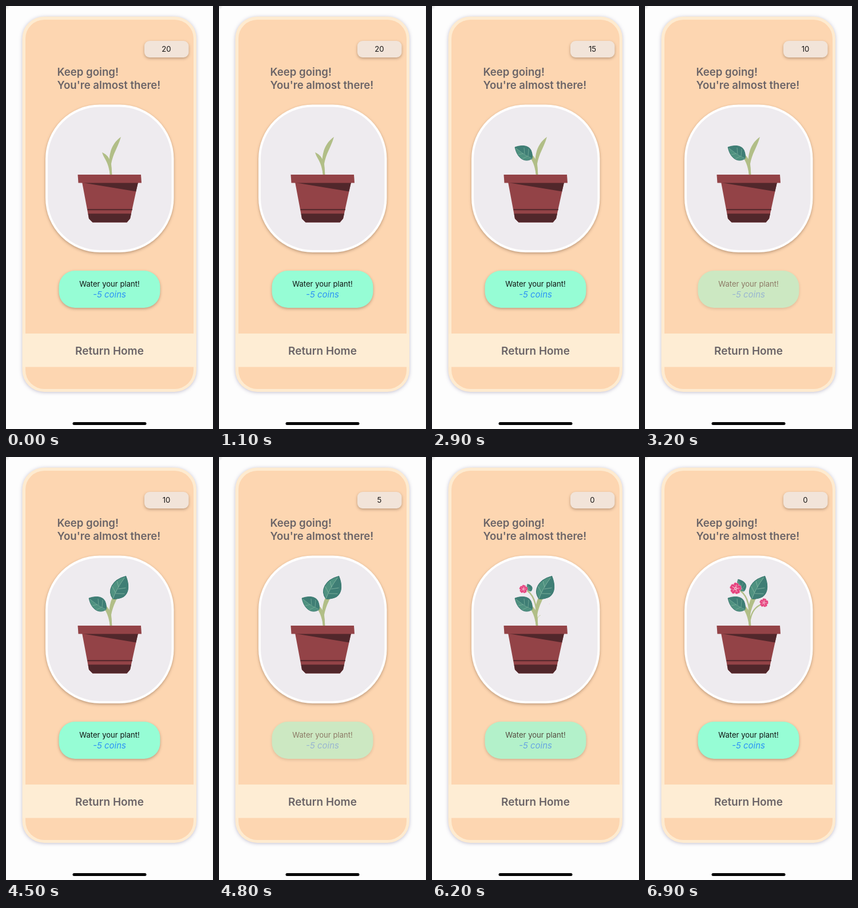
An HTML page that plays this animation: 362 by 740 pixels, repeating every 7.8 s.

```html
<!DOCTYPE html>
<html lang="en">
<head>
<meta charset="utf-8">
<title>Water your plant</title>
<style>
  html, body { margin: 0; width: 100%; height: 100%; overflow: hidden; background: #fdfdfd; }
  svg { display: block; width: 362px; height: 740px; font-family: Inter, Roboto, sans-serif; }
  .head { font-weight: 600; fill: #6b6467; }
  .mid { text-anchor: middle; }
  .card { filter: drop-shadow(0 1px 3px rgba(70, 60, 110, .32)); }
  .lift { filter: drop-shadow(0 2px 2.5px rgba(80, 50, 30, .36)); }
  .stem { fill: none; stroke: #b1be87; stroke-linecap: round; }
  .red { fill: #934347; }
  .dark { fill: #51272b; }
</style>
</head>
<body>
<svg viewBox="0 0 362 740">
  <defs>
    <radialGradient id="corner"><stop stop-color="#ddd"/><stop offset="1" stop-color="#fdfdfd"/></radialGradient>
    <g id="leaf">
      <path d="M0 0C-12 8-26 0-30-20C-19-24-7-24-2-15C0-10 1-6 0 0Z" fill="#4f9180" stroke="#2f6f68" stroke-width=".8"/>
      <path d="M0 0C-9-3-21-12-30-20C-19-24-7-24-2-15C0-10 1-6 0 0Z" fill="#3f7e75"/>
      <path d="M0 0Q-14-6-28-18M-7-4L-6-17M-13-8L-14-19M-8-4L-17 0M-15-9L-24-7" fill="none" stroke="#82b5a0" stroke-width=".7"/>
    </g>
    <g id="flower"></g>
  </defs>

  <circle r="7" fill="url(#corner)"/>
  <path d="M361.5 0V740" stroke="#f5f5f5"/>

  <rect class="card" x="28.5" y="18.5" width="304.5" height="656.5" rx="38" fill="#feebd0"/>
  <rect x="34" y="24" width="294" height="646" rx="33" fill="#fdd6b1"/>
  <rect x="29" y="573" width="303.5" height="58.5" fill="#feedd4"/>

  <rect class="lift" x="242" y="61" width="77.5" height="29" rx="9" fill="#f2e4d9"/>
  <text id="coins" class="mid" x="280.5" y="80.3" font-size="13.2" fill="#161414">20</text>

  <g class="head" font-size="18.6">
    <text x="89.5" y="122.3">Keep going!</text>
    <text x="89.5" y="145.3">You're almost there!</text>
    <text class="mid" x="181" y="609.6" font-size="19">Return Home</text>
  </g>

  <rect class="lift" x="69" y="172.5" width="224.5" height="258.5" rx="95" fill="#fff"/>
  <rect x="73" y="176.5" width="216.5" height="250.5" rx="91" fill="#eeebef"/>

  <g id="bud2"><path class="stem" d="M184 284C187 270 193 262 205 257" stroke-width="2.4"/></g>
  <g id="twig"><path class="stem" d="M183 288C184 265 180 244 167 234" stroke-width="2.4"/></g>
  <g fill="#b1be87">
    <path d="M182 296C178 268 180 244 201 229C196 247 187 258 184 276L185.5 296Z"/>
    <path d="M185 296C185 272 181 262 168 256C172 269 179 271 182 296Z"/>
  </g>
  <g id="leaf1"><use href="#leaf" transform="translate(175 267)"/></g>
  <g id="leaf2"><use href="#leaf" transform="translate(187 248) rotate(92) scale(1.27 -1.23) rotate(180) scale(-1 1) rotate(-5)"/></g>
  <g id="leaf3"><use href="#leaf" transform="translate(173 235) rotate(32) scale(.66 .62)"/></g>
  <g id="bloom1"><use href="#flower" transform="translate(158.5 230)"/></g>
  <g id="bloom2"><use href="#flower" transform="translate(208 255) scale(.75)"/></g>

  <path class="red" d="M133 308H231L217 372L211.5 378.5H151.5L145 372Z"/>
  <path class="dark" d="M133.5 309H231L227.3 324.5Z"/>
  <path class="dark" d="M142.3 355.3H221L220.6 357.3H142.7ZM143.6 363.3H219L217 372L211.5 378.5H151.5L145 372Z"/>
  <path class="red" d="M125.5 295H236L237 309.5H126.5Z"/>

  <g id="button">
    <rect class="lift" x="92.5" y="463" width="177" height="65" rx="28" fill="#96fdd5"/>
    <text class="mid" x="181" y="491" font-size="13.1" fill="#101312">Water your plant!</text>
    <text class="mid" x="181" y="509.7" font-size="15" font-style="italic" fill="#2b92f5">-5 coins</text>
  </g>

  <rect x="116.5" y="728" width="129" height="5" rx="2.5"/>
</svg>
<script>
const LOOP = 7800, FADE = 330;
const $ = id => document.getElementById(id);

// [pressed, released]
const taps = [[1940, 1985], [2990, 3090], [4590, 4690], [5890, 5990]];

// id: growth origin, then [start, end, from, to] stages
const growth = {
  leaf1:  [175, 267, [2080, 2680, 0, 1]],
  leaf2:  [187, 248, [3260, 3880, 0, 1]],
  twig:   [183, 288, [4720, 5300, 0, 1]],
  leaf3:  [173, 235, [4950, 5450, 0, .52], [6050, 6600, .52, 1]],
  bloom1: [164, 234, [4950, 5450, 0, .66], [6050, 6600, .66, 1]],
  bud2:   [184, 284, [6050, 6500, 0, 1]],
  bloom2: [205, 257, [6150, 6600, 0, 1]]
};

const petals = Array.from({ length: 5 }, (_, i) =>
  `<g transform="rotate(${i * 72 + 12})">
    <path d="M0 0C-6-3-6-10-2-10Q0-9 1-10C6-9 5-3 0 0Z" fill="#e5407c" stroke="#f3a2c0" stroke-width=".6"/>
    <path d="M0-2V-7" stroke="#f8bfd3" stroke-width=".9"/>
  </g>`).join('');
$('flower').innerHTML = petals + '<circle r="2.2" fill="#fbd9e2"/><circle r="1" fill="#c92f65"/>';

const clamp = x => Math.min(1, Math.max(0, x));
const ease = x => x * x * (3 - 2 * x);

function draw(t) {
  let alpha = 1, coins = 20;
  for (const [down, up] of taps) {
    if (t >= down) alpha = .2 + .8 * clamp((t - up) / FADE);
    if (t >= up) coins -= 5;
  }
  $('button').setAttribute('opacity', alpha);
  $('coins').textContent = coins;

  for (const [id, [x, y, ...stages]] of Object.entries(growth)) {
    let size = 0;
    for (const [start, end, from, to] of stages)
      if (t >= start) size = from + (to - from) * ease(clamp((t - start) / (end - start)));
    $(id).setAttribute('transform', `translate(${x} ${y}) scale(${size}) translate(${-x} ${-y})`);
  }
}

const begin = performance.now();
function tick() {
  draw((performance.now() - begin) % LOOP);
  requestAnimationFrame(tick);
}
tick();
</script>
</body>
</html>
```
